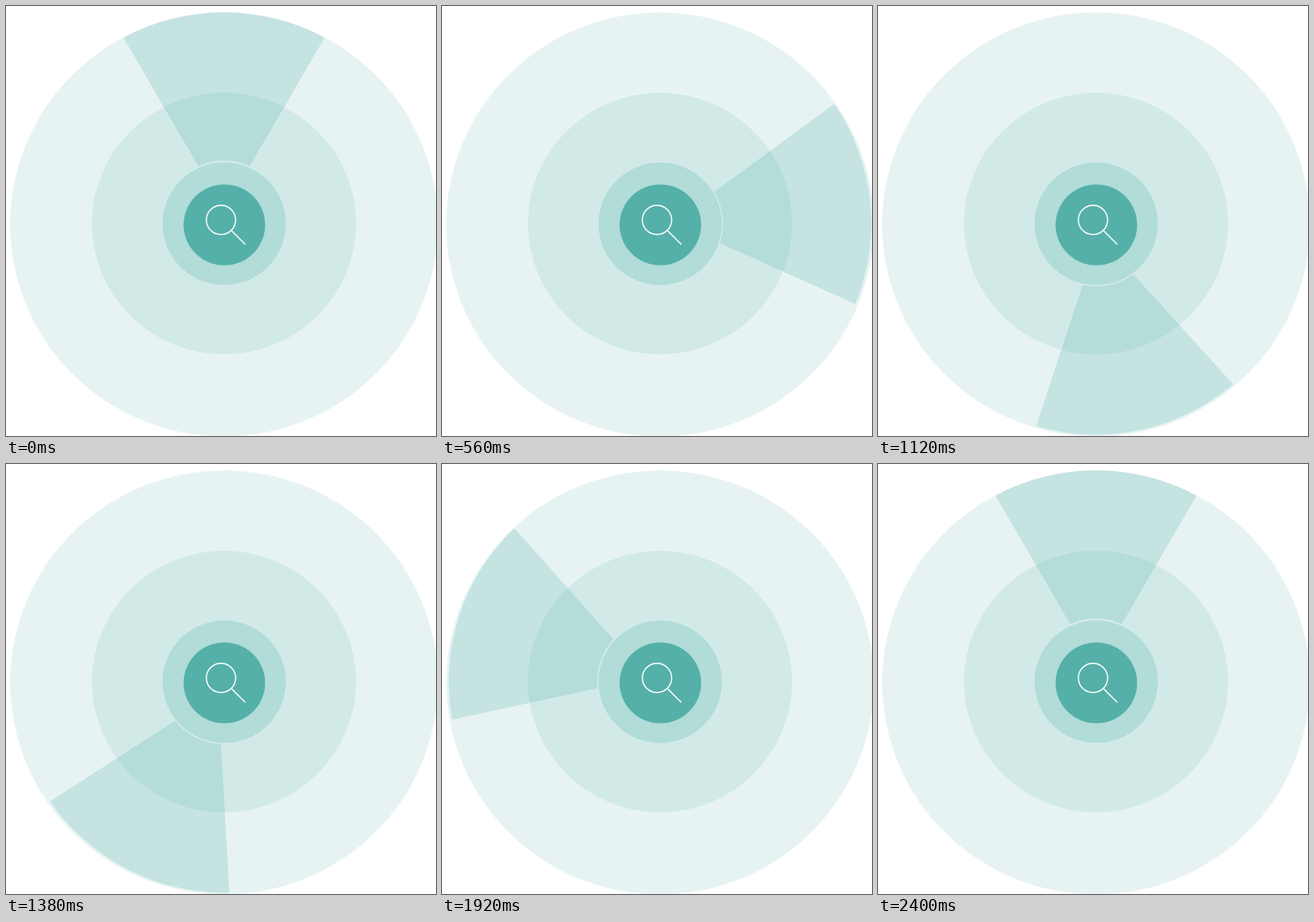
Write an HTML page that moves like this. It is 500x500 px and loops after 2.42 s.

```html
<!DOCTYPE html>
<html lang="en">
<head>
<meta charset="utf-8">
<title>Radar search</title>
<style>
  html, body { margin: 0; width: 100%; height: 100%; overflow: hidden; background: #fff; }
  svg { display: block; width: 100%; height: 100%; }
</style>
</head>
<body>
<svg viewBox="0 0 500 500">
  <ellipse cx="253.5" cy="254" rx="248.7" ry="246.5" fill="#e7f3f3"/>
  <ellipse cx="253.5" cy="253" rx="153.6" ry="152.2" fill="#d2eae7"/>
  <ellipse cx="253.7" cy="253.2" rx="71.7" ry="71.2" fill="#b1dcd8"/>
  <ellipse cx="253.9" cy="254.5" rx="47.4" ry="47" fill="#54b0a8"/>
  <g fill="none" stroke="#fff" stroke-width="1.4">
    <circle cx="250" cy="248.7" r="17"/>
    <path d="M262 261L278.3 277.2"/>
  </g>
  <path id="beam" fill="#54b0a8" fill-opacity=".24"
    d="M-117 -216A246 246 0 0 1 117 -216L30 -66.8A73 73 0 0 0 -30 -66.8Z"/>
</svg>
<script>
  const LOOP = 2420, TURN = 2400, STEP = 20;
  const beam = document.getElementById('beam');
  const start = performance.now();

  function draw() {
    const t = (performance.now() - start) % LOOP;
    const angle = Math.floor(t / STEP) * STEP / TURN * 360;
    beam.setAttribute('transform', `translate(253.5 252.8) rotate(${angle})`);
    requestAnimationFrame(draw);
  }
  draw();
</script>
</body>
</html>
```
